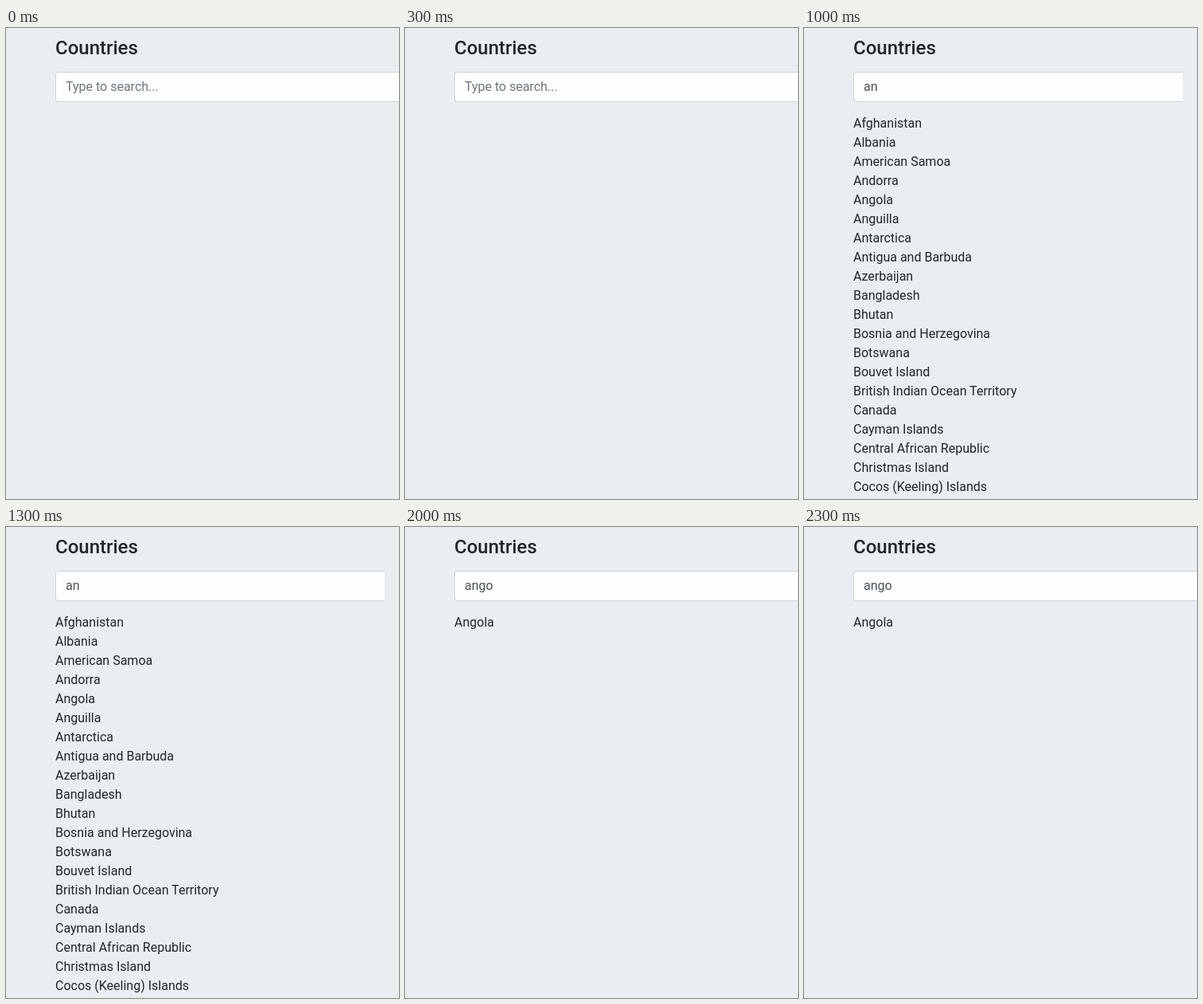
These frames come from a looping animation (494 by 591 pixels, 2500 ms). An HTML page:

```html
<!DOCTYPE html>
<html lang="en">
<head>
<meta charset="utf-8">
<title>Country search</title>
<style>
  html, body { margin: 0; width: 100%; height: 100%; overflow: hidden; background: #e9eff1; }
  body { position: relative; font: 400 16px/19px Roboto, sans-serif; color: #212529; }
  h1, #field, #list { position: absolute; left: 62px; margin: 0; white-space: nowrap; }
  h1 { top: 11px; font-size: 24px; font-weight: 500; line-height: 28px; }
  #field {
    top: 55px; height: 38px; box-sizing: border-box; padding: 8px 0 0 12px; overflow: hidden;
    background: #fdfffc; border: 1px solid #ced4da; border-right: 0;
    border-radius: 4px 0 0 4px; color: #495057;
  }
  #field.empty { color: #6c757d; }
  #list { top: 108px; padding: 0; list-style: none; }
  #list li { padding: 2px 0 3px; }
</style>
</head>
<body>
<h1>Countries</h1>
<div id="field"></div>
<ul id="list"></ul>
<script>
const countries = [
  'Afghanistan', 'Albania', 'Algeria', 'American Samoa', 'Andorra', 'Angola', 'Anguilla',
  'Antarctica', 'Antigua and Barbuda', 'Argentina', 'Armenia', 'Aruba', 'Australia', 'Austria',
  'Azerbaijan', 'Bahamas', 'Bahrain', 'Bangladesh', 'Barbados', 'Bhutan',
  'Bosnia and Herzegovina', 'Botswana', 'Bouvet Island', 'British Indian Ocean Territory',
  'Canada', 'Cayman Islands', 'Central African Republic', 'Christmas Island',
  'Cocos (Keeling) Islands'
];

// Each step: typed text, right edge of the field, visible rows
const steps = [
  ['', 494, 0],
  ['a', 451, 19],
  ['an', 476, 20],
  ['ang', 489, 20],
  ['ango', 494, 20]
];
const STEP_MS = 500;

const field = document.getElementById('field');
const list = document.getElementById('list');
let current = -1;

function show([query, right, rows]) {
  field.textContent = query || 'Type to search...';
  field.classList.toggle('empty', !query);
  field.style.width = right - 62 + 'px';
  const matches = countries.filter(name => name.toLowerCase().includes(query)).slice(0, rows);
  list.replaceChildren(...matches.map(name => {
    const item = document.createElement('li');
    item.textContent = name;
    return item;
  }));
}

const start = performance.now();
function tick(now) {
  const index = Math.floor(Math.max(0, now - start) / STEP_MS) % steps.length;
  if (index !== current) show(steps[current = index]);
  requestAnimationFrame(tick);
}
tick(start);
</script>
</body>
</html>
```
